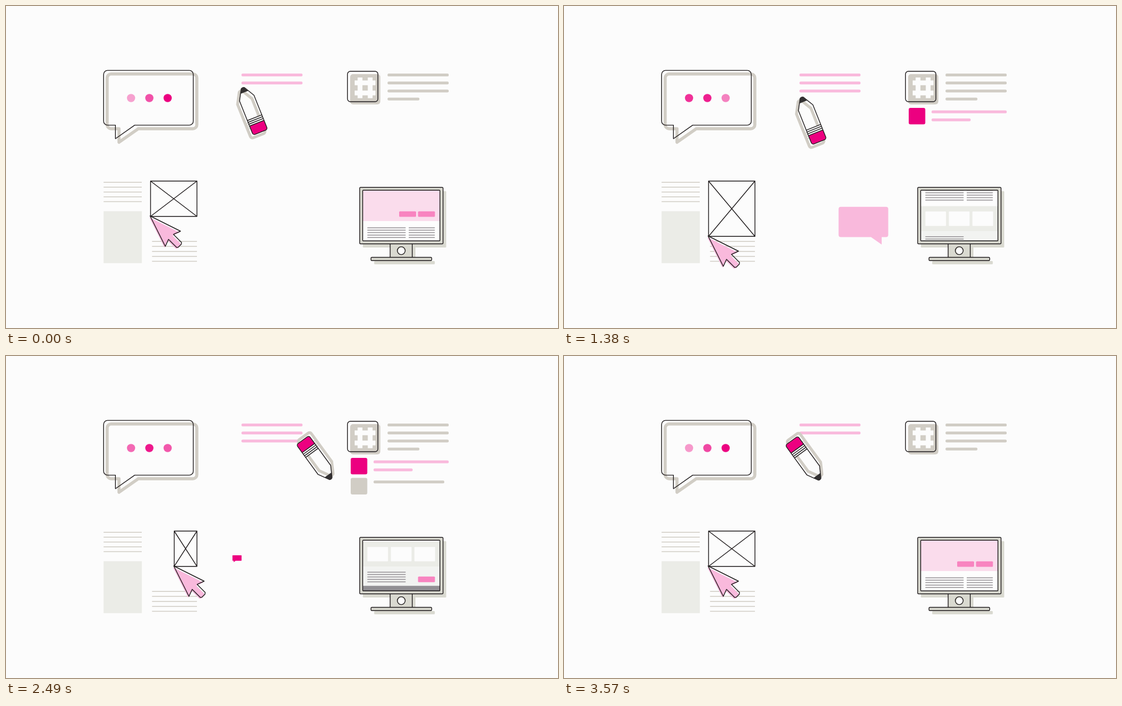
An HTML page with a canvas that plays this animation: 980 by 572 pixels, repeating every 3.6 s.

```html
<!DOCTYPE html>
<html lang="en">
<head>
<meta charset="utf-8">
<title>Content icons</title>
<style>
html, body { margin: 0; width: 980px; height: 572px; overflow: hidden; background: #fcfcfc; }
canvas { display: block; }
</style>
</head>
<body>
<canvas id="stage" width="980" height="572"></canvas>
<script>
const ctx = document.getElementById('stage').getContext('2d');
const LOOP = 3600, STEP = 30;
const INK = '#231f20', GREY = '#d1cdc5', PINK = '#f9b9dc', MAGENTA = '#ec0080', PAPER = '#fcfcfc';
const CASE = '#d9d9d0', PALE = '#ebece7', BUTTON = '#f884c0', RULE = '#969296';

const clamp = v => Math.max(0, Math.min(1, v));
const ease = v => { v = clamp(v); return v * v * (3 - 2 * v); };
const between = (t, a, b) => ease((t - a) / (b - a));

// Scale that grows from zero, overshoots, then settles at one.
function pop(age) {
  if (age <= 0) return 0;
  return age < 130 ? 1.18 * Math.sin(age / 130 * Math.PI / 2) ** 1.6
                   : 1.18 - 0.18 * between(age, 130, 330);
}

function fill(color) { ctx.fillStyle = color; ctx.fill(); }
function stroke(color = INK, width = 1.4) { ctx.strokeStyle = color; ctx.lineWidth = width; ctx.stroke(); }
function box(x, y, w, h, r = 0) { ctx.beginPath(); ctx.roundRect(x, y, w, h, r); }
function block(x, y, w, h, color, r) { box(x, y, w, h, r); fill(color); }
function disc(x, y, r) { ctx.beginPath(); ctx.arc(x, y, r, 0, 7); }
function poly(points) {
  ctx.beginPath();
  points.forEach(p => ctx.lineTo(...p));
  ctx.closePath();
}
function bar(x, w, y, color) {
  if (w > 4) block(x, y - 2.5, w, 5, color, 2.2);
}
function rules(x, w, y, gap, color) {
  ctx.beginPath();
  for (let i = 0; i < 5; i++) {
    ctx.moveTo(x, y + i * gap);
    ctx.lineTo(x + w, y + i * gap);
  }
  stroke(color, 1.5);
}
function placed(x, y, draw, scale = 1, alpha = 1) {
  if (scale <= 0 || alpha <= 0) return;
  ctx.save();
  ctx.globalAlpha = alpha;
  ctx.translate(x, y);
  ctx.scale(scale, scale);
  draw();
  ctx.restore();
}

// Speech bubble of width w with the tip of its tail at the origin; side -1 mirrors it.
function speech(w, side = 1) {
  const left = -0.132 * w, right = left + w, bottom = -0.151 * w, top = bottom - 0.611 * w, r = 0.044 * w;
  ctx.beginPath();
  ctx.moveTo(0, 0);
  ctx.lineTo(0, bottom);
  ctx.arcTo(side * left, bottom, side * left, top, r);
  ctx.arcTo(side * left, top, side * right, top, r);
  ctx.arcTo(side * right, top, side * right, bottom, r);
  ctx.arcTo(side * right, bottom, 0, bottom, r);
  ctx.lineTo(side * 0.215 * w, bottom);
  ctx.closePath();
}

function typingBubble(t) {
  placed(200.6, 242, () => { speech(159.2); stroke(GREY, 5.5); });
  placed(194.3, 235.7, () => { speech(159.2); stroke(); });
  for (let i = 1; i <= 3; i++) {
    const q = (t / 900 - i / 3 + 1) % 1;
    const glow = q < 2 / 3 ? 1 - 0.96 * q : 0.36 + 0.64 * Math.sin((q - 2 / 3) * 1.5 * Math.PI);
    placed(189.5 + 32.5 * i, 163.5, () => { disc(0, 0, 7.3); fill(MAGENTA); }, 1, glow);
  }
}

const PENCIL = 85.4, HALF = 13.8;
function pencilBody() {
  ctx.beginPath();
  ctx.moveTo(-3, 1);
  ctx.quadraticCurveTo(0, -1, 3, 1);
  ctx.lineTo(HALF, 20);
  ctx.arcTo(HALF, PENCIL, -HALF, PENCIL, 4);
  ctx.arcTo(-HALF, PENCIL, -HALF, 20, 4);
  ctx.lineTo(-HALF, 20);
  ctx.closePath();
}
function ferrule(w, color) {
  ctx.beginPath();
  for (let i = 0; i < 4; i++) {
    ctx.moveTo(-HALF, 57.5 + 3.5 * i);
    ctx.lineTo(w - HALF, 57.5 + 3.5 * i);
  }
  stroke(color);
}
function pencil(x, y, angle) {
  ctx.save();
  ctx.translate(x, y);
  ctx.rotate(angle);
  ctx.translate(0, -PENCIL / 2);
  placed(-5.5, 4.3, () => { pencilBody(); stroke(GREY, 5); ferrule(7, GREY); });
  block(-HALF, 57.5, 2 * HALF, 11, PAPER);
  block(-HALF, 68, 2 * HALF, PENCIL - 68, MAGENTA, [0, 0, 4, 4]);
  ferrule(2 * HALF, INK);
  pencilBody();
  stroke();
  ctx.clip();
  block(-HALF, -2, 2 * HALF, 11, '#333132');
  ctx.restore();
}

function writing(t) {
  const write3 = between(t, 0, 700), back = between(t, 700, 1340), write4 = between(t, 1340, 1740);
  const flip = between(t, 1740, 1950);
  const erase4 = between(t, 1950, 2227), up = between(t, 2227, 2450), erase3 = between(t, 2450, 3110);

  // The head is the end touching the paper: the tip first, the eraser after the flip.
  const headX = 420 + 103 * (write3 - back) + 57 * write4 - 62 * erase4 + 113 * up - 124 * erase3;
  const headY = 145 + 4 * write3 + 13 * back + write4 + 2 * flip - 15.5 * up + erase3;
  const lean = 0.38 + 0.25 * (write3 - between(t, 700, 1080)) + 0.08 * flip + 0.17 * up;

  const inkEnd = headX - 418 - 6 * flip;
  const third = t < 700 || t > 2450 ? Math.min(108.5, inkEnd) : 108.5;
  const fourth = t > 1340 && t < 2227 ? inkEnd : 0;
  [108.5, 108.5, third, fourth].forEach((w, i) => bar(418, w, 122.5 + 14.2 * i, PINK));
  pencil(headX + PENCIL / 2 * Math.sin(lean), headY + PENCIL / 2 * Math.cos(lean), Math.PI * flip - lean);
}

function listItem(t, start, y, square, lines, linesAt) {
  const out = 1 - between(t, 3150, 3500);
  placed(626.7, y, () => block(-14.7, -14.7, 29.4, 29.4, square, 3),
    pop(t - start), out * clamp((t - start) / 135));
  ctx.globalAlpha = out;
  bar(652.5, 133.5 * between(t, linesAt, linesAt + 340), y - 7.5, lines);
  bar(652.5, 69.5 * between(t, linesAt + 300, linesAt + 530), y + 6.7, lines);
  ctx.globalAlpha = 1;
}

function hashList(t) {
  block(611, 121, 53.5, 53.7, GREY, 5);
  for (const d of [0, 18]) {
    block(624.3 + d, 127, 8.5, 36.7, PAPER);
    block(619, 132.3 + d, 37, 8.5, PAPER);
  }
  box(606.3, 116, 54, 54, 5);
  stroke();
  for (let i = 0; i < 4; i++) bar(677.3, i < 3 ? 108.7 : 56.7, 122.6 + 14.2 * i, GREY);
  listItem(t, 440, 195.6, MAGENTA, PINK, 810);
  listItem(t, 1605, 231.2, GREY, GREY, 2200);
}

// Arrow cursor pointing up left, symmetric about its diagonal.
function arrow() {
  const half = [[54, 27], [41.5, 32.7], [55.8, 47], [55.5, 50]];
  poly([[0, 0], ...half, ...half.map(([x, y]) => [y, x]).reverse()]);
}

function layout(t) {
  const drop = between(t, 192, 932), shrink = between(t, 1380, 2100), widen = between(t, 2450, 3170);
  const x = 256.6 + 42.4 * (shrink - widen), y = 373.7 + 35.5 * (drop - shrink);
  rules(173.3, 67.7, 313.2, 8.6, GREY);
  rules(259.3, 79.7, 418.3, 8.8, GREY);
  block(173.3, 364.5, 67.9, 92.2, PALE);

  box(x, 311, 339 - x, y - 311);
  ctx.moveTo(x, 311);
  ctx.lineTo(339, y);
  ctx.moveTo(339, 311);
  ctx.lineTo(x, y);
  stroke();
  placed(x - 2.3, y + 1.5, () => { arrow(); fill(PINK); });
  placed(x - 0.8, y - 0.7, () => { arrow(); stroke(); });
}

function chat(t) {
  const p = t % 1800;
  const show = (x, y, from, to, draw) => placed(x, y, draw, pop(p - from), 1 - between(p, to, to + 140));
  show(438.2, 453.2, 110, 550, () => {
    placed(3.3, 3.3, () => { speech(93); fill(GREY); });
    speech(93);
    stroke();
  });
  show(404.2, 366.2, 660, 1190, () => { speech(72); fill(MAGENTA); });
  show(564, 423.8, 1230, 1620, () => { speech(75, -1); fill(PINK); });
}

function page() {
  const left = 641.5, button = 731.5, copy = 68;
  block(633, 327, 138, 55, '#fadcec');
  block(button - 33.5, 364.8, 30, 9.8, BUTTON, 1.5);
  block(button, 364.8, 30, 9.8, BUTTON, 1.5);
  rules(left, copy, 394, 4.3, RULE);
  rules(715, 46.3, 394, 4.3, RULE);
  block(633, 422, 138, 44.7, PALE);
  for (let i = 0; i < 3; i++) block(left + 41.8 * i, 431.5, 36.7, 25.7, PAPER, 1);
  block(633, 466.7, 138, 34, '#f2f3f1');
  rules(left, copy, 476.3, 4.3, RULE);
  block(button, 484, 30, 10, BUTTON, 1.5);
  block(633, 500.7, 138, 30, '#918f93');
}

function monitor(t) {
  const scroll = 54 * between(t, 0, 740) + 40.5 * between(t, 1110, 1840) - 94.5 * between(t, 2425, 3145);
  const casing = paint => {
    box(682, 422.3, 39.3, 24.7);
    paint();
    box(648, 446.5, 107.7, 5.7, 1.5);
    paint();
    box(627.9, 322.2, 148, 100.3, 1.5);
    paint();
  };
  placed(5.6, 6.5, () => casing(() => fill(CASE)));
  casing(() => { fill(CASE); stroke(); });
  disc(702.5, 435.2, 6.2);
  fill(PAPER);
  disc(701.7, 434.6, 7);
  stroke();

  const screen = () => box(633.3, 327.3, 137.1, 90, 1);
  screen();
  fill('#fdfdfd');
  ctx.save();
  ctx.clip();
  placed(0, -scroll, page);
  ctx.restore();
  screen();
  stroke();
}

function draw(now) {
  const t = Math.floor(now % LOOP / STEP) * STEP;
  ctx.fillStyle = PAPER;
  ctx.fillRect(0, 0, 980, 572);
  ctx.lineJoin = 'round';
  [typingBubble, writing, hashList, layout, chat, monitor].forEach(part => part(t));
}

const start = performance.now();
function tick() {
  draw(performance.now() - start);
  requestAnimationFrame(tick);
}
tick();
</script>
</body>
</html>
```
